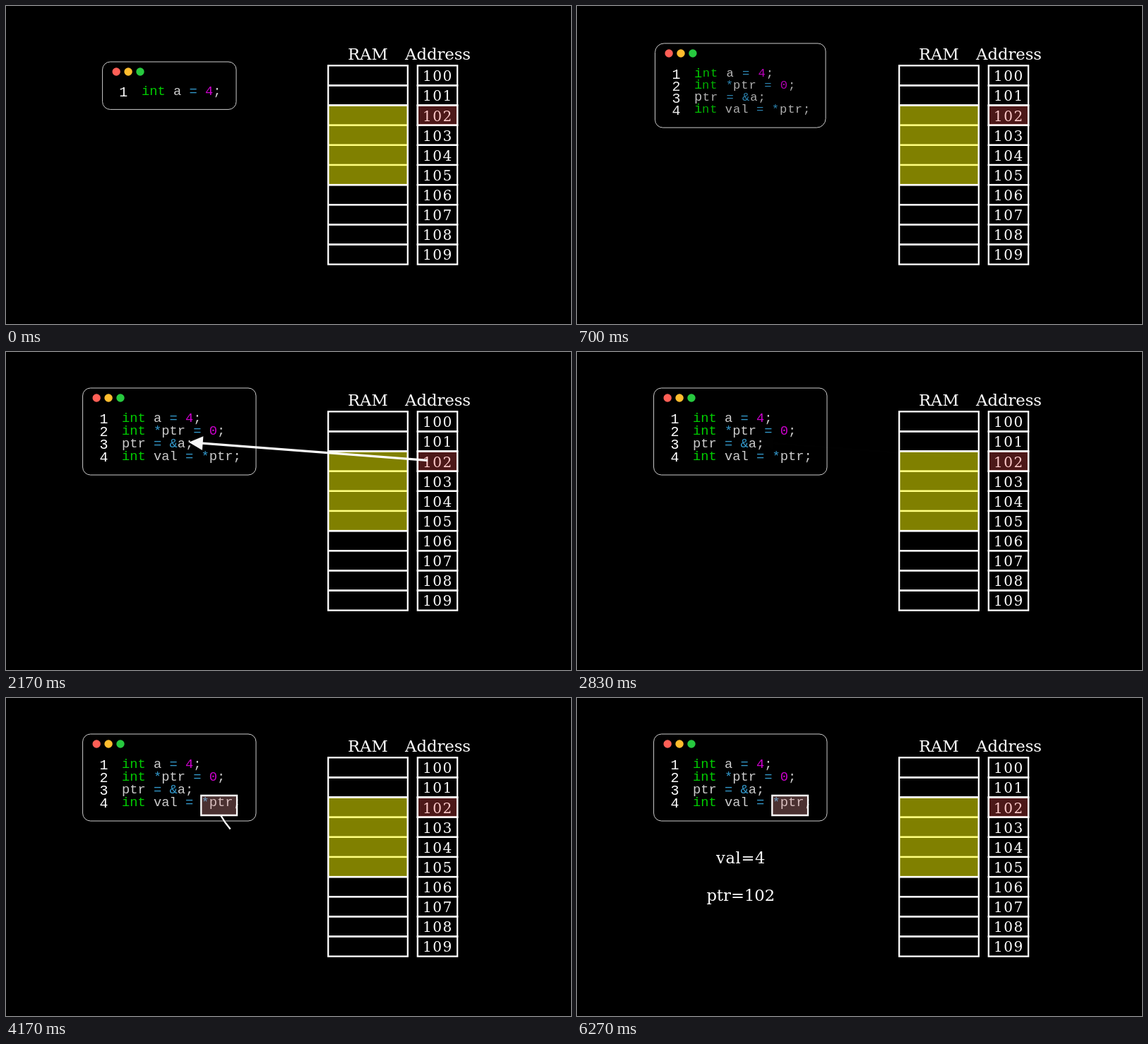
Animation of 800 by 450 pixels, one loop 8 s. Source, as an HTML page with a canvas:

```html
<!DOCTYPE html>
<html>
<head>
<meta charset="utf-8">
<style>
html, body { margin: 0; width: 100%; height: 100%; overflow: hidden; background: #000; }
canvas { display: block; }
</style>
</head>
<body>
<canvas id="stage" width="800" height="450"></canvas>
<script>
const ctx = document.getElementById('stage').getContext('2d');
const LOOP = 8000, RUN = 833;
const SERIF = '"DejaVu Serif", serif', MONO = '"Liberation Mono", monospace';
const GREEN = '#00cd00', BLUE = '#3399cc', PURPLE = '#cd00cd', GREY = '#cccccc';
const ADVANCE = 11.25;
const LINES = ['int a = 4;', 'int *ptr = 0;', 'ptr = &a;', 'int val = *ptr;'];

const clamp = v => Math.min(1, Math.max(0, v));
const lerp = (a, b, f) => a + (b - a) * f;
const sigmoid = v => 1 / (1 + Math.exp(-v));
const smooth = v => {
  const edge = sigmoid(-5);
  return clamp((sigmoid(10 * (clamp(v) - 0.5)) - edge) / (1 - 2 * edge));
};
const progress = (t, start) => clamp((t - start) / RUN);

function text(str, x, y, size, { font = SERIF, color = '#fff', align = 'center', gap = 0 } = {}) {
  ctx.font = `${size}px ${font}`;
  ctx.letterSpacing = gap + 'px';
  ctx.textAlign = align;
  ctx.fillStyle = color;
  ctx.fillText(str, x + (align === 'center' ? gap / 2 : 0), y);
  ctx.letterSpacing = '0px';
}

function box(x, y, w, h, fill) {
  if (fill) {
    ctx.fillStyle = fill;
    ctx.fillRect(x, y, w, h);
  }
  ctx.strokeStyle = '#fff';
  ctx.lineWidth = 2.3;
  ctx.strokeRect(x, y, w, h);
}

// Traces the given share of a closed polygon's outline.
function tracePolygon(points, share) {
  const sides = points.length, reach = share * sides;
  ctx.beginPath();
  ctx.moveTo(...points[0]);
  for (let i = 0; i < sides && i < reach; i++) {
    const a = points[i], b = points[(i + 1) % sides], f = Math.min(1, reach - i);
    ctx.lineTo(lerp(a[0], b[0], f), lerp(a[1], b[1], f));
  }
  if (share >= 1) ctx.closePath();
}

function memory() {
  const row = 28.13, top = 84.3;
  text('RAM', 512.3, 76, 22.7);
  text('Address', 611.5, 76, 22.7);
  for (let i = 0; i < 10; i++) {
    const y = top + i * row;
    box(456.2, y, 112.6, row);
    box(582.8, y, 56.3, row);
    text(String(100 + i), 610.6, y + 22, 20, { gap: 1.5 });
  }
  box(456.2, top + 2 * row, 112.6, 4 * row, 'rgba(255,255,0,.5)');
  box(582.8, top + 2 * row, 56.3, row, 'rgba(252,80,80,.3)');
}

function charColor(line, i) {
  const ch = line[i];
  if (line.startsWith('int') && i < 3) return GREEN;
  if ('=*&'.includes(ch)) return BLUE;
  return /\d/.test(ch) ? PURPLE : GREY;
}

function glyph(ch, x, y, scale, color, alpha) {
  ctx.save();
  ctx.globalAlpha = alpha;
  ctx.translate(x + ADVANCE / 2, y - 6);
  ctx.scale(scale, scale);
  text(ch, 0, 6, 18.75, { font: MONO, color });
  ctx.restore();
}

function editor(t) {
  const f = smooth(progress(t, 75)), bump = Math.sin(Math.PI * f);
  const left = lerp(136.6, 108.6, f), top = lerp(79, 51, f);
  const right = lerp(326, 354, f), bottom = lerp(146.4, 174, f);
  const loose = 11 + 8 * bump;
  ctx.strokeStyle = '#ccc';
  ctx.lineWidth = 1;
  ctx.beginPath();
  ctx.roundRect(left, top, right - left, bottom - top, [loose, 11, loose, 11]);
  ctx.stroke();

  ['#ff5f56', '#ffbd2e', '#27c93f'].forEach((color, i) => {
    ctx.fillStyle = color;
    ctx.beginPath();
    ctx.arc(left + 19.6 + 16.9 * i, top + 14, 5.7, 0, 7);
    ctx.fill();
  });

  LINES.forEach((line, row) => {
    const alpha = row ? f : 1;
    ctx.globalAlpha = alpha;
    text(String(row + 1), lerp(166.3, 138.6, f), lerp(128, 100.8 + 18.2 * row, f), 20, { font: MONO });
    ctx.globalAlpha = 1;
    const y = lerp(126, 98.7 + 18.15 * row, f);
    [...line].forEach((ch, i) => {
      const from = Math.floor(i * LINES[0].length / line.length);
      const x = lerp(192 + from * ADVANCE, 164 + i * ADVANCE, f);
      const dip = i ? bump : 0;
      glyph(ch, x, y, 1 - 0.4 * dip, charColor(line, i), alpha * (1 - 0.4 * dip));
    });
  });
}

function arrowTip(x, y, angle, share) {
  if (share <= 0) return;
  const len = 19.7, half = 9.85, c = Math.cos(angle), s = Math.sin(angle);
  const corner = side => [x - len * c - side * half * s, y - len * s + side * half * c];
  tracePolygon([[x, y], corner(1), corner(-1)], share);
  ctx.fill();
}

// Draws the shaft in the first half and the tip in the second, then fades.
function arrow(t, start, fadeStart, width, shaft, tip) {
  const p = progress(t, start), fade = smooth(progress(t, fadeStart));
  if (p <= 0 || fade >= 1) return;
  ctx.globalAlpha = 1 - fade;
  ctx.strokeStyle = ctx.fillStyle = '#fff';
  ctx.lineWidth = width;
  ctx.beginPath();
  shaft(smooth(2 * p));
  ctx.stroke();
  arrowTip(...tip, smooth(2 * p - 1));
  ctx.globalAlpha = 1;
}

function straightArrow(t) {
  const [x0, y0, x1, y1] = [597, 153.4, 259, 127.7];
  arrow(t, 1033, 2033, 3.4, f => {
    ctx.moveTo(x0, y0);
    ctx.lineTo(lerp(x0, x1 + 19, f), lerp(y0, y1 + 1.4, f));
  }, [x1, y1, Math.atan2(y1 - y0, x1 - x0)]);
}

function curvedArrow(t) {
  const deg = Math.PI / 180;
  arrow(t, 4033, 5033, 2.3, f => {
    ctx.arc(402.5, 111.4, 112.6, 151 * deg, (151 - 80 * f) * deg, true);
  }, [457, 210, -26 * deg]);
}

function highlight(t) {
  const f = smooth(progress(t, 3033));
  if (f <= 0) return;
  tracePolygon([[327, 138], [276.3, 138], [276.3, 166], [327, 166]], f);
  ctx.fillStyle = 'rgba(247,161,163,.3)';
  ctx.fill();
  ctx.strokeStyle = '#fff';
  ctx.lineWidth = 2.3;
  ctx.stroke();
}

// Writes letters one after another: outline first, then fill.
function write(t, str, x, y, size, gap) {
  const p = progress(t, 5033);
  if (p <= 0) return;
  if (p >= 1) return text(str, x, y, size, { gap });
  ctx.font = `${size}px ${SERIF}`;
  ctx.textAlign = 'left';
  ctx.lineWidth = 1;
  ctx.strokeStyle = ctx.fillStyle = '#fff';
  const span = ctx.measureText(str).width + gap * (str.length - 1);
  let penX = x - span / 2;
  [...str].forEach((ch, i) => {
    const v = clamp(p * (1 + 0.2 * (str.length - 1)) - 0.2 * i);
    const outline = smooth(2 * v), fill = smooth(2 * v - 1);
    if (v > 0) {
      ctx.setLineDash([60 * outline, 200]);
      ctx.globalAlpha = 1 - fill;
      ctx.strokeText(ch, penX, y);
      ctx.setLineDash([]);
      ctx.globalAlpha = fill;
      ctx.fillText(ch, penX, y);
    }
    penX += ctx.measureText(ch).width + gap;
  });
  ctx.globalAlpha = 1;
}

function draw(now) {
  const t = now % LOOP;
  ctx.fillStyle = '#000';
  ctx.fillRect(0, 0, 800, 450);
  memory();
  editor(t);
  highlight(t);
  straightArrow(t);
  curvedArrow(t);
  write(t, 'val=4', 231.7, 233.7, 22.7, 0.6);
  write(t, 'ptr=102', 231.8, 287.3, 22.7, 0);
  requestAnimationFrame(draw);
}
requestAnimationFrame(draw);
</script>
</body>
</html>
```
